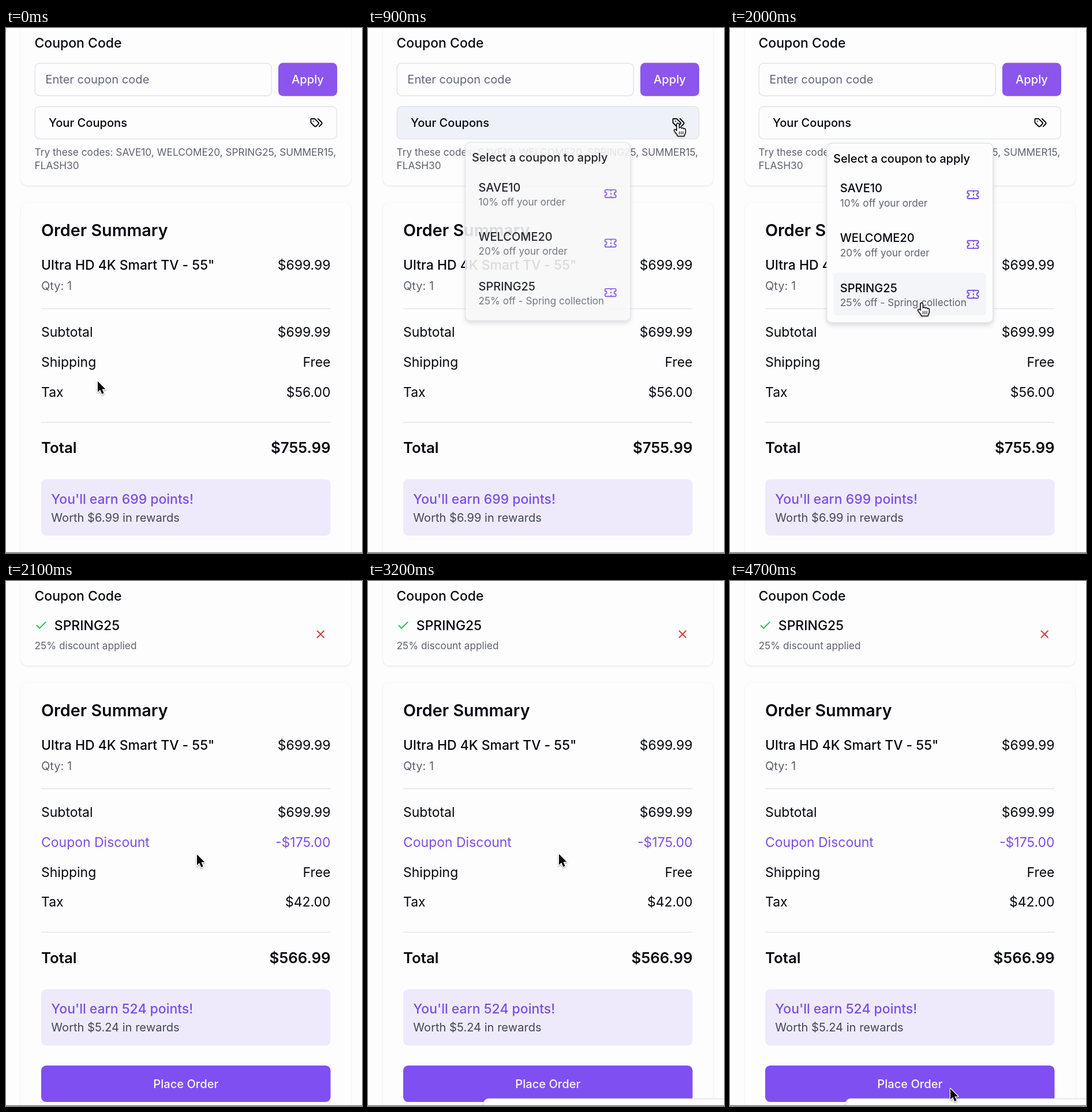
These frames come from a looping animation (617 px wide and 908 px high, 4800 ms). An HTML page with a canvas:

```html
<!DOCTYPE html>
<html lang="en">
<head>
<meta charset="utf-8">
<title>Coupon checkout</title>
<style>
  html, body { margin: 0; width: 100%; height: 100%; overflow: hidden; background: #fdfdfe; }
  canvas { display: block; width: 617px; height: 908px; }
</style>
</head>
<body>
<canvas id="stage" width="617" height="908"></canvas>
<script>
const ctx = document.getElementById('stage').getContext('2d');
const LOOP = 4800, STEP = 100;
const APPLIED_AT = 2100;

const SIZE = { xs: 17.23, sm: 20.1, base: 22.97, lg: 25.85, xl: 28.72 };
const INK = '#06070f', MUTED = '#5f616e', LINE = '#e1e3e9', PURPLE = '#7c4de3', PAGE = '#fdfdfe';

const ICONS = {
  tags: 'm15 5 6.3 6.3a2.4 2.4 0 0 1 0 3.4L17 19M9.586 5.586A2 2 0 0 0 8.172 5H3a1 1 0 0 0-1 1v5.172a2 2 0 0 0 .586 1.414L8.29 18.29a2.426 2.426 0 0 0 3.42 0l3.58-3.58a2.426 2.426 0 0 0 0-3.42zM6.5 9.4v.2',
  ticket: 'M2 9a3 3 0 0 1 0 6v2a2 2 0 0 0 2 2h16a2 2 0 0 0 2-2v-2a3 3 0 0 1 0-6V7a2 2 0 0 0-2-2H4a2 2 0 0 0-2 2ZM13 5v2M13 17v2M13 11v2',
  check: 'M20 6 9 17l-5-5',
  cross: 'M18 6 6 18M6 6l12 12'
};
for (const name in ICONS) ICONS[name] = new Path2D(ICONS[name]);

const ARROW = new Path2D('M0 0V18.6L4.2 14.7L7.3 22L10.6 20.6L7.5 13.4H13.3Z');
const HAND = new Path2D('M-1 5c0-3.4 4.4-3.4 4.4 0v6.2c.4-1.8 3.8-1.6 4 .6 .6-1.6 3.6-1.2 3.8 .8 .8-1.2 3.2-.6 3.2 1.4v4c0 2.6-2 3.6-2.2 7H.6c-.4-3.2-3.6-5.2-5.6-8.6-1.4-2.6 1.4-4 3-2.2l1 1.2z');
const PALM = new Path2D('M3.6 17v4.6M6.8 17v4.6M10 17v4.6');

// Pointer hotspot: time, x, y
const TRACK = [
  [200, 159, 611], [300, 185, 578], [500, 380, 330], [700, 530, 172], [800, 536, 162],
  [1000, 536, 162], [1200, 510, 205], [1500, 420, 330], [1800, 340, 455], [1900, 331, 473],
  [3850, 331, 472], [4100, 336, 551], [4500, 376, 835], [4650, 382, 878]
];

const COUPONS = [
  ['SAVE10', '10% off your order'],
  ['WELCOME20', '20% off your order'],
  ['SPRING25', '25% off - Spring collection']
];

const clamp = v => Math.max(0, Math.min(1, v));
const easeOut = v => 1 - (1 - clamp(v)) ** 2.5;

function pointerAt(t) {
  if (t <= TRACK[0][0]) return { x: TRACK[0][1], y: TRACK[0][2] };
  const i = TRACK.findIndex(k => k[0] >= t);
  if (i < 0) return { x: TRACK.at(-1)[1], y: TRACK.at(-1)[2] };
  const [t0, x0, y0] = TRACK[i - 1], [t1, x1, y1] = TRACK[i];
  const p = (t - t0) / (t1 - t0);
  return { x: x0 + (x1 - x0) * p, y: y0 + (y1 - y0) * p };
}

const inside = (p, x, y, w, h) => p.x >= x && p.x <= x + w && p.y >= y && p.y <= y + h;

// y is the middle of the capital letters
function text(str, x, y, size, weight = 400, color = INK, align = 'left') {
  ctx.font = `${weight} ${size}px Inter, sans-serif`;
  ctx.fillStyle = color;
  ctx.textAlign = align;
  ctx.fillText(str, x, y + size * 0.3636);
}

function box(x, y, w, h, r, fill, stroke, shadow) {
  ctx.save();
  ctx.beginPath();
  ctx.roundRect(x, y, w, h, r);
  if (shadow) [ctx.shadowColor, ctx.shadowOffsetY, ctx.shadowBlur] = shadow;
  ctx.fillStyle = fill;
  ctx.fill();
  ctx.shadowColor = 'transparent';
  if (stroke) {
    ctx.strokeStyle = stroke;
    ctx.lineWidth = 1.4;
    ctx.stroke();
  }
  ctx.restore();
}

function icon(name, x, y, color) {
  ctx.save();
  ctx.translate(x, y);
  ctx.scale(0.957, 0.957);
  ctx.translate(-12, -12);
  ctx.strokeStyle = color;
  ctx.lineWidth = 2;
  ctx.lineCap = ctx.lineJoin = 'round';
  ctx.stroke(ICONS[name]);
  ctx.restore();
}

function rule(y) {
  ctx.fillStyle = LINE;
  ctx.fillRect(61, y - 0.7, 501.5, 1.4);
}

function row(label, value, y, color = INK) {
  text(label, 61, y, SIZE.base, 400, color);
  text(value, 562.5, y, SIZE.base, 400, color, 'right');
}

const card = (y, bottom) => box(26, y, 572, bottom - y, 11.5, PAGE, null, ['rgba(0,0,0,.11)', 1.2, 3]);

function couponForm(hovered) {
  card(-40, 272.5);
  text('Coupon Code', 49.5, 25.5, SIZE.base, 500);
  box(50.2, 61, 410, 56.2, 8, PAGE, LINE);
  text('Enter coupon code', 68.3, 89, SIZE.sm, 400, '#62687a');
  box(472, 60.3, 102, 57.4, 8, '#8c55ed');
  text('Apply', 523, 89, SIZE.sm, 500, '#fbf9ff', 'center');
  box(50.2, 135.7, 523.2, 56.2, 8, hovered ? '#eef1f8' : PAGE, LINE);
  text('Your Coupons', 74, 163.7, SIZE.sm, 500);
  icon('tags', 538, 163.7, INK);
  text('Try these codes: SAVE10, WELCOME20, SPRING25, SUMMER15,', 49.5, 215, SIZE.xs, 400, MUTED);
  text('FLASH30', 49.5, 238, SIZE.xs, 400, MUTED);
}

function appliedCoupon() {
  card(-40, 146.5);
  text('Coupon Code', 49.5, 25.5, SIZE.base, 500);
  icon('check', 61, 77, '#2fbf68');
  text('SPRING25', 83.8, 77, SIZE.base, 500);
  text('25% discount applied', 49.5, 111.5, SIZE.xs, 400, MUTED);
  icon('cross', 545.2, 92, '#d93a3a');
}

function summary(applied) {
  const top = applied ? -126.3 : 0;
  const low = applied ? top + 51.7 : 0;
  card(301.5 + top, 1000);
  text('Order Summary', 61, 350 + top, SIZE.xl, 600);
  text('Ultra HD 4K Smart TV - 55"', 61, 410 + top, SIZE.base, 500);
  text('$699.99', 562.5, 410 + top, SIZE.base, 400, INK, 'right');
  text('Qty: 1', 61, 445.5 + top, SIZE.sm, 400, MUTED);
  rule(485.5 + top);
  row('Subtotal', '$699.99', 526 + top);
  if (applied) row('Coupon Discount', '-$175.00', 451.6, PURPLE);
  row('Shipping', 'Free', 577.8 + low);
  row('Tax', applied ? '$42.00' : '$56.00', 629.5 + low);
  rule(682 + low);
  text('Total', 61, 726 + low, SIZE.lg, 600);
  text(applied ? '$566.99' : '$755.99', 562.5, 726 + low, SIZE.lg, 600, INK, 'right');
  box(61, 780.5 + low, 501.5, 97.5, 8.6, '#eeeafb');
  text(`You'll earn ${applied ? 524 : 699} points!`, 78.3, 814.6 + low, SIZE.base, 500, PURPLE);
  text(`Worth $${applied ? '5.24' : '6.99'} in rewards`, 78.3, 846.5 + low, SIZE.sm, 400, '#444754');
  if (applied) {
    box(61, 838, 501.5, 63, 8.6, '#7f4ff2');
    text('Place Order', 311.8, 869.3, SIZE.sm, 500, '#fbf9ff', 'center');
  }
}

function couponMenu(open, hovered) {
  ctx.save();
  ctx.globalAlpha = open;
  ctx.translate(311.7, 354.5 - 16 * (1 - open));
  const scale = 0.95 + 0.05 * open;
  ctx.scale(scale, scale);
  ctx.translate(-311.7, -354.5);
  box(167.7, 199.2, 288, 310.3, 8.6, PAGE, LINE, ['rgba(0,0,0,.16)', 4, 8]);
  text('Select a coupon to apply', 179, 225.3, SIZE.sm, 500);
  COUPONS.forEach(([code, note], i) => {
    const y = 86.1 * i;
    if (i === hovered) box(179.5, 251 + y, 264.5, 74, 6, '#f4f5f8');
    text(code, 190.7, 277 + y, SIZE.sm, 500);
    text(note, 190.7, 302.5 + y, SIZE.xs, 400, MUTED);
    icon('ticket', 421, 288.3 + y, PURPLE);
  });
  ctx.restore();
}

function pointer(p, hand) {
  ctx.save();
  ctx.translate(p.x, p.y);
  ctx.lineJoin = ctx.lineCap = 'round';
  ctx.shadowColor = 'rgba(0,0,0,.35)';
  ctx.shadowOffsetY = 1.5;
  ctx.shadowBlur = 3;
  if (hand) {
    ctx.fillStyle = '#fff';
    ctx.fill(HAND);
    ctx.shadowColor = 'transparent';
    ctx.strokeStyle = '#111';
    ctx.lineWidth = 1.6;
    ctx.stroke(HAND);
    ctx.lineWidth = 1.2;
    ctx.stroke(PALM);
  } else {
    ctx.strokeStyle = '#fff';
    ctx.lineWidth = 2.6;
    ctx.stroke(ARROW);
    ctx.shadowColor = 'transparent';
    ctx.fillStyle = '#08080a';
    ctx.fill(ARROW);
  }
  ctx.restore();
}

function draw(t) {
  const applied = t >= APPLIED_AT;
  const p = pointerAt(t);
  const open = applied ? 0 : easeOut((t - 818) / 150);
  const onButton = !applied && inside(p, 50, 135, 524, 57);
  const hovered = open ? COUPONS.findIndex((c, i) => inside(p, 179.5, 251 + 86.1 * i, 264.5, 74)) : -1;

  ctx.fillStyle = PAGE;
  ctx.fillRect(0, 0, 617, 908);
  if (applied) appliedCoupon(); else couponForm(onButton);
  summary(applied);
  if (open) couponMenu(open, hovered);
  if (applied) {
    const rise = easeOut((t - APPLIED_AT) / 150);
    box(200.5, 895.5 + 106 * (1 - rise), 450, 106, 8.6, PAGE, LINE, ['rgba(0,0,0,.12)', 4, 8]);
  }
  ctx.fillStyle = '#77777c';
  ctx.fillRect(0, 906.7, 617, 1.3);
  pointer(p, onButton || hovered >= 0);
}

function tick() {
  const t = performance.now() % LOOP;
  draw(Math.floor(t / STEP) * STEP);
  requestAnimationFrame(tick);
}
tick();
</script>
</body>
</html>
```
